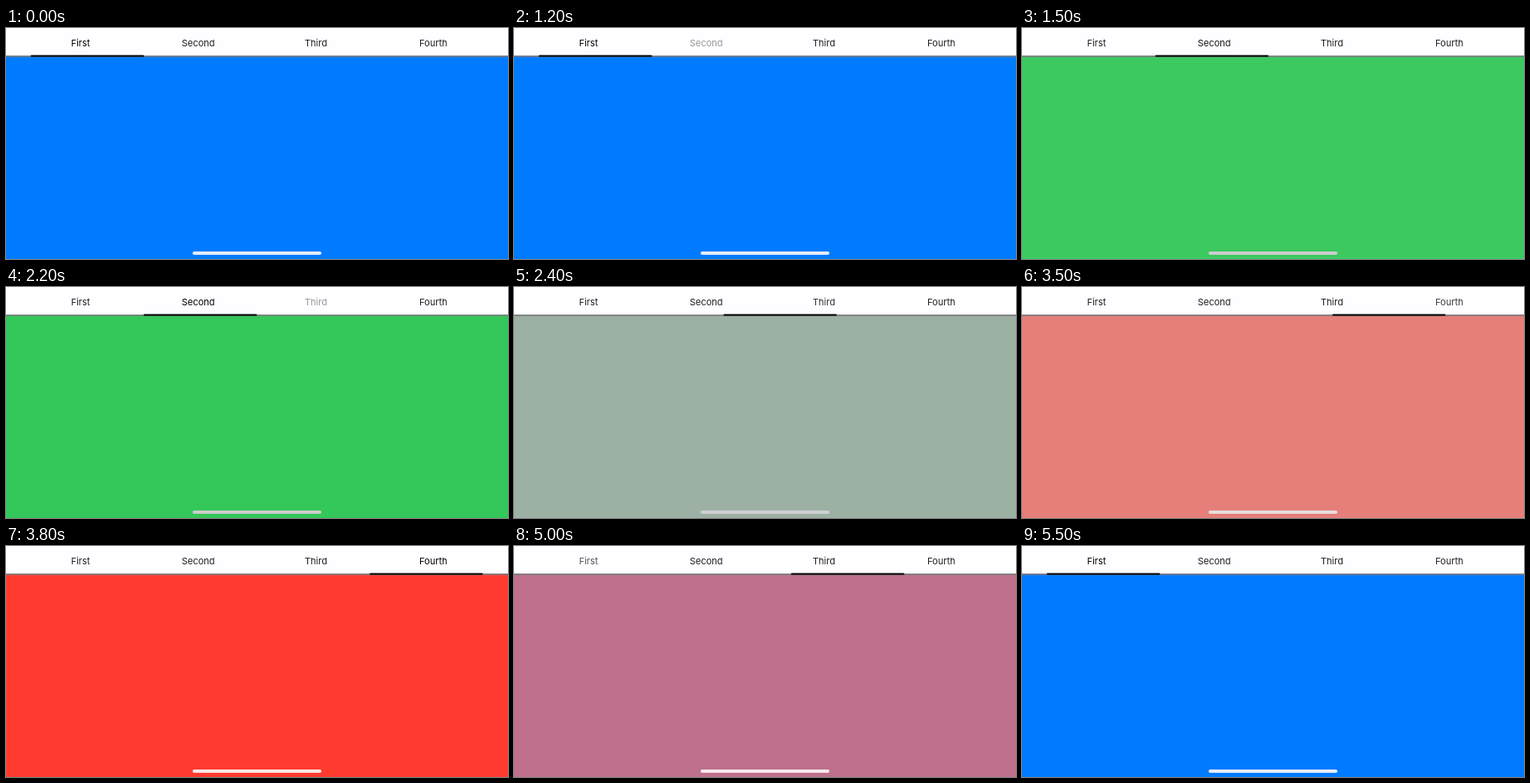
An HTML page with a canvas that plays this animation: 600 px wide and 277 px high, repeating every 5700 ms.

```html
<!DOCTYPE html>
<html lang="en">
<head>
<meta charset="utf-8">
<title>Tabs</title>
<style>
  html, body { margin: 0; width: 100%; height: 100%; overflow: hidden; background: #fff; }
  canvas { display: block; width: 600px; height: 277px; }
</style>
</head>
<body>
<canvas id="stage" width="600" height="277"></canvas>
<script>
const ctx = document.getElementById('stage').getContext('2d');
const LOOP = 5700, STEP = 100, SLIDE = 300, RELEASE = 460;

const tabs = [
  { label: 'First',  x: 89,    page: [0, 122, 255],   bar: [228, 236, 250] },
  { label: 'Second', x: 229.8, page: [52, 199, 89],   bar: [204, 204, 206] },
  { label: 'Third',  x: 370.4, page: [142, 142, 147], bar: [209, 209, 214] },
  { label: 'Fourth', x: 510.8, page: [255, 59, 48],   bar: [251, 231, 230] }
];

// Each tap: finger down, then release, which starts the slide.
const taps = [
  { from: 0, to: 1, down: 1100, up: 1242 },
  { from: 1, to: 2, down: 2000, up: 2226 },
  { from: 2, to: 3, down: 3300, up: 3345 },
  { from: 3, to: 0, down: 4900, up: 4895 }
];

const clamp = v => Math.min(1, Math.max(0, v));
const mix = (a, b, p) => a.map((v, i) => v + (b[i] - v) * p);
const rgb = c => `rgb(${c.map(Math.round).join(',')})`;

// cubic-bezier(.42, 0, .58, 1)
function easeInOut(x) {
  if (x <= 0 || x >= 1) return clamp(x);
  let lo = 0, hi = 1;
  for (let i = 0; i < 24; i++) {
    const s = (lo + hi) / 2, r = 1 - s;
    const bx = 3 * r * r * s * 0.42 + 3 * r * s * s * 0.58 + s * s * s;
    if (bx < x) lo = s; else hi = s;
  }
  return lo * lo * (3 - 2 * lo);
}

// The new page fades in over the old one, which fades out over white.
function crossfade(a, b, p) {
  const faded = mix(a, [255, 255, 255], p);
  return mix(faded, b, p);
}

function pill(x, y, w, h, color) {
  ctx.fillStyle = color;
  ctx.beginPath();
  ctx.roundRect(x, y, w, h, h / 2);
  ctx.fill();
}

function draw(t) {
  const tap = taps.filter(k => t >= Math.min(k.down, k.up)).pop();
  const from = tap ? tap.from : 0, to = tap ? tap.to : 0;
  const p = tap ? easeInOut((t - tap.up) / SLIDE) : 1;
  const dim = tap ? Math.pow(1 - clamp((t - tap.up) / RELEASE), 2.4) : 0;
  const pos = from + (to - from) * p;
  const active = tap && t >= tap.up && p > 0 ? to : from;

  ctx.fillStyle = rgb(crossfade(tabs[from].page, tabs[to].page, p));
  ctx.fillRect(0, 33, 600, 244);

  ctx.fillStyle = '#fefdff';
  ctx.fillRect(0, 0, 600, 33);
  [0.95, 0.7, 0.12].forEach((a, i) => {
    ctx.fillStyle = `rgba(126,126,130,${a})`;
    ctx.fillRect(0, 33 + i, 600, 1);
  });

  ctx.font = '11px Inter, Roboto, sans-serif';
  ctx.textAlign = 'center';
  ctx.textBaseline = 'alphabetic';
  tabs.forEach((tab, i) => {
    const base = i === active ? 0 : 30;
    const g = tap && i === to ? base + (153 - base) * dim : base;
    ctx.fillStyle = rgb([g, g, g]);
    ctx.fillText(tab.label, tab.x, 21.5);
  });

  pill(29.5 + 135 * pos, 32.4, 135.5, 2.1, '#000');
  pill(223, 268.1, 154, 3.8, rgb(mix(tabs[from].bar, tabs[to].bar, p)));
}

const start = performance.now();
function tick(now) {
  const t = Math.max(0, now - start) % LOOP;
  draw(Math.floor(t / STEP) * STEP);
  requestAnimationFrame(tick);
}
draw(0);
requestAnimationFrame(tick);
</script>
</body>
</html>
```
